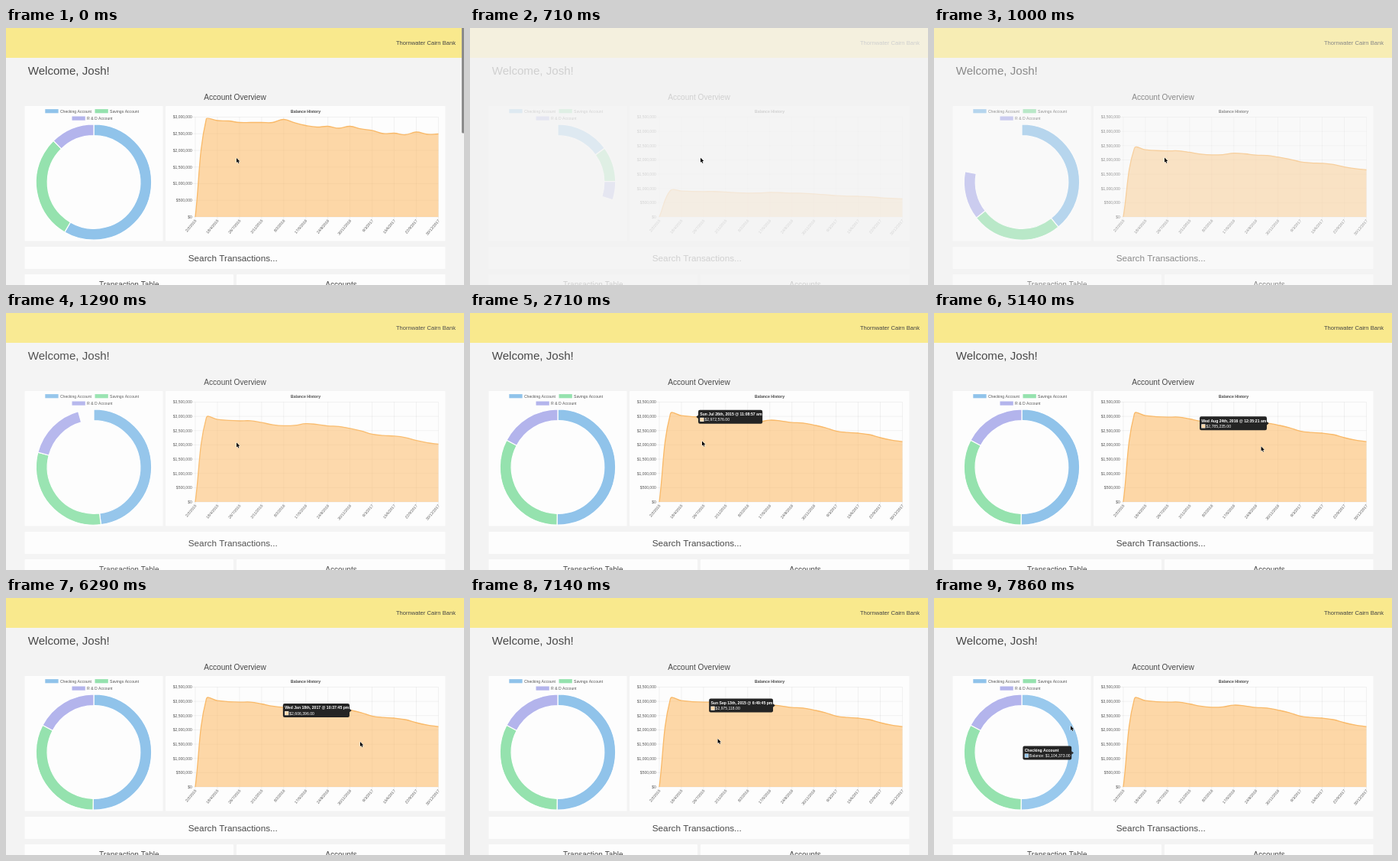
Recreate the animation shown at these times as an HTML page with a canvas. Size 600x336 px, loop 8000 ms.

```html
<!DOCTYPE html>
<html lang="en">
<head>
<meta charset="utf-8">
<title>Account overview</title>
<style>
html, body { margin: 0; width: 100%; height: 100%; overflow: hidden; background: #f3f3f3; }
canvas { display: block; width: 600px; height: 336px; }
</style>
</head>
<body>
<canvas></canvas>
<script>
const canvas = document.querySelector('canvas');
const c = canvas.getContext('2d');
const dpr = window.devicePixelRatio || 1;
canvas.width = 600 * dpr;
canvas.height = 336 * dpr;

const LOOP = 8000, STEP = 1000 / 7;
const BG = '#f3f3f3', CARD = '#fdfdfd';
const BLUE = '#90c3ea', GREEN = '#95e2ae', PURPLE = '#b3b4ec', ORANGE = '#f9b968';
const FILL = 'rgba(253,191,111,.6)';
const LEFT = 248, TOP = 116.5, BASE = 247, GAP = 14.475, LAST = 22;

// balances in thousands, donut split as fractions of a turn
const before = {
  max: 3000, split: [0, .584, .877, 1],
  vals: [0, 2954, 2897, 2885, 2839, 2839, 2839, 2839, 2931, 2828, 2747, 2701, 2724,
    2667, 2724, 2644, 2598, 2506, 2517, 2471, 2552, 2483, 2494]
};
const after = {
  max: 3500, split: [0, .502, .827, 1],
  vals: [0, 3087, 3025, 2987, 2972.576, 2975.118, 2910, 2830, 2792, 2805, 2868, 2841, 2785.235,
    2768, 2695, 2606.396, 2485, 2435, 2414, 2360, 2253, 2172, 2118]
};

// pointer path: time, x, y
const path = [
  [0, 302, 170], [2430, 302, 169], [2571, 296, 168], [2714, 304, 167.5], [3000, 308, 168],
  [4000, 385, 167], [4714, 455, 192], [5000, 439, 180], [5143, 428.6, 174.5], [5430, 426, 176],
  [6143, 453, 186], [6286, 464, 188], [6714, 475, 192], [7000, 400, 188], [7286, 249, 180],
  [7429, 188, 171], [7714, 181, 168], [7857, 179, 167], [8000, 179, 167]
];

const clamp = v => Math.max(0, Math.min(1, v));

function pointer(t) {
  const i = Math.max(1, path.findIndex(k => k[0] >= t));
  const [a, b] = [path[i - 1], path[i]];
  const f = clamp((t - a[0]) / (b[0] - a[0]));
  return [a[1] + (b[1] - a[1]) * f, a[2] + (b[2] - a[2]) * f];
}

function dateOf(k) {
  if (!k) return new Date(Date.UTC(2015, 1, 2, 9, 15, 20));
  const ms = Date.UTC(2015, 6, 26, 11, 8, 57) + (k - 4) * 4261248000;
  const month = new Date(ms).getUTCMonth();
  const winter = month < 3 || month > 9;
  return new Date(ms - winter * 3600000);
}

function shortDate(k) {
  const d = dateOf(k);
  return [d.getUTCDate(), d.getUTCMonth() + 1, d.getUTCFullYear()].join('/');
}

function longDate(k) {
  const d = dateOf(k), n = d.getUTCDate(), h = d.getUTCHours();
  const [day, , month] = d.toUTCString().replace(',', '').split(' ');
  const suffix = n > 10 && n < 14 ? 'th' : ['th', 'st', 'nd', 'rd'][n % 10] || 'th';
  const time = (h % 12 || 12) + d.toISOString().slice(13, 19);
  return `${day} ${d.toUTCString().split(' ')[2]} ${n}${suffix}, ${d.getUTCFullYear()} @ ${time} ${h < 12 ? 'am' : 'pm'}`;
}

function rect(x, y, w, h, color, r = 0) {
  c.fillStyle = color;
  c.beginPath();
  c.roundRect(x, y, w, h, r);
  c.fill();
}

function font(size, weight = '') {
  c.font = `${weight} ${size}px "Liberation Sans", Arial, sans-serif`;
}

function text(str, x, y, size, color = '#484848', align = 'left', weight = '') {
  font(size, weight);
  c.textAlign = align;
  c.fillStyle = color;
  c.fillText(str, x, y);
}

function line(x1, y1, x2, y2) {
  c.beginPath();
  c.moveTo(x1, y1);
  c.lineTo(x2, y2);
  c.stroke();
}

function legend(x, y, label, color) {
  rect(x, y, 17.3, 5.2, color);
  text(label, x + 19.6, y + 4.5, 5.1, '#555');
}

function donut(split, grow, hover) {
  const colors = [hover ? '#99c9ed' : BLUE, GREEN, PURPLE];
  c.strokeStyle = '#fff';
  c.lineWidth = 1.2;
  colors.forEach((color, i) => {
    const [a, b] = [split[i], split[i + 1]].map(s => (s * grow - .25) * 2 * Math.PI);
    c.beginPath();
    c.arc(115, 201.5, 75.7, a, b);
    c.arc(115, 201.5, 60.8, b, a, true);
    c.closePath();
    c.fillStyle = color;
    c.fill();
    c.stroke();
  });
}

function axes(max) {
  c.strokeStyle = 'rgba(0,0,0,.1)';
  c.lineWidth = .5;
  for (let v = 0; v <= max; v += 500) {
    const y = BASE - v / max * (BASE - TOP);
    line(LEFT - 4, y, LEFT + LAST * GAP, y);
    text('$' + (v * 1000).toLocaleString('en-US'), 243.7, y + 1.8, 5, '#555', 'right');
  }
  for (let k = 0; k <= LAST; k += 2) {
    const x = LEFT + k * GAP;
    line(x, TOP, x, BASE + 4);
    c.save();
    c.translate(x + .5, BASE + 4);
    c.rotate(-50 * Math.PI / 180);
    text(shortDate(k), 0, 1.8, 5, '#555', 'right');
    c.restore();
  }
}

const yOf = (data, k, grow = 1) => BASE - data.vals[k] / data.max * (BASE - TOP) * grow;

function area(data, grow) {
  const pts = data.vals.map((_, k) => [LEFT + k * GAP, yOf(data, k, grow)]);
  const cap = y => Math.max(TOP, Math.min(BASE, y));
  const handles = pts.map((p, i) => {
    const a = pts[i - 1] || p, b = pts[i + 1] || p;
    const d1 = Math.hypot(p[0] - a[0], p[1] - a[1]);
    const d2 = Math.hypot(b[0] - p[0], b[1] - p[1]);
    const [f, g] = [d1, d2].map(d => .4 * d / (d1 + d2));
    return [p[0] - f * (b[0] - a[0]), cap(p[1] - f * (b[1] - a[1])),
      p[0] + g * (b[0] - a[0]), cap(p[1] + g * (b[1] - a[1]))];
  });
  const curve = new Path2D();
  curve.moveTo(...pts[0]);
  for (let i = 1; i < pts.length; i++) {
    curve.bezierCurveTo(handles[i - 1][2], handles[i - 1][3], handles[i][0], handles[i][1], ...pts[i]);
  }
  const under = new Path2D(curve);
  under.lineTo(LEFT + LAST * GAP, BASE);
  under.lineTo(LEFT, BASE);
  c.fillStyle = FILL;
  c.fill(under);
  c.strokeStyle = ORANGE;
  c.lineWidth = 1.3;
  c.stroke(curve);
}

function tooltip(x, y, title, body, color, toRight) {
  font(5.1, 'bold');
  const titleW = c.measureText(title).width;
  font(5.1);
  const w = Math.max(titleW + 3, c.measureText(body).width + 10);
  const left = toRight ? x + 3 : x - 3 - w, side = toRight ? 3 : -3;
  const dark = '#242424';
  rect(left, y - 9, w, 18, dark, 2.2);
  c.beginPath();
  c.moveTo(x + side * .1, y);
  c.lineTo(x + side, y - 2.2);
  c.lineTo(x + side, y + 2.2);
  c.fill();
  text(title, left + 2.3, y - 1.7, 5.1, '#fff', 'left', 'bold');
  rect(left + 2.3, y + 1, 5.2, 5.2, '#fff');
  rect(left + 2.8, y + 1.5, 4.2, 4.2, color);
  text(body, left + 8.4, y + 5.5, 5.1, '#fff');
}

function lineTip(t) {
  const [x] = pointer(t), [lag] = pointer(t - STEP);
  if (t < 2430 || lag < LEFT) return;
  const pos = (lag - LEFT) / GAP, i = Math.floor(pos);
  const y = yOf(after, i) + (yOf(after, i + 1) - yOf(after, i)) * (pos - i);
  const k = Math.max(0, Math.min(LAST, Math.round((x - LEFT) / GAP)));
  const body = '$' + Math.round(after.vals[k] * 1000).toLocaleString('en-US') + '.00';
  // the first point sits on the axis
  tooltip(lag, pos < .5 ? BASE : y, longDate(k), body, '#fdd8a9', lag < 400);
}

function arrow(x, y) {
  const shape = [[0, 0], [0, 6], [1.4, 4.8], [2.4, 7.1], [3.4, 6.7], [2.4, 4.4], [4.3, 4.4]];
  c.beginPath();
  shape.forEach(([dx, dy]) => c.lineTo(x + dx, y + dy));
  c.closePath();
  c.strokeStyle = '#fff';
  c.lineWidth = .9;
  c.stroke();
  c.fillStyle = '#000';
  c.fill();
}

function page(data, grow, t) {
  const hover = t > 7500;
  rect(0, 0, 600, 39, '#f9e98d');
  text('Thornwater Cairn Bank', 589, 21.7, 7.6, '#444', 'right');
  text('Welcome, Josh!', 28.7, 61, 15.1);
  text('Account Overview', 300, 94, 10.15, '#484848', 'center');

  rect(24.5, 102, 181, 176.5, CARD, 1);
  legend(51.3, 106.1, 'Checking Account', BLUE);
  legend(116.5, 106.1, 'Savings Account', GREEN);
  legend(86.5, 115.5, 'R & D Account', PURPLE);
  donut(data.split, grow, hover);

  rect(209, 102, 366.5, 176.5, CARD, 1);
  text('Balance History', 392.5, 111, 5.2, '#484848', 'center', 'bold');
  axes(data.max);
  area(data, grow);

  rect(24.5, 286, 551, 29, CARD, 1);
  text('Search Transactions...', 297.3, 304.5, 11.75, '#484848', 'center');
  rect(24.5, 322, 273.5, 20, CARD, 1);
  rect(302, 322, 273.5, 20, CARD, 1);
  text('Transaction Table', 161.3, 338.8, 10, '#484848', 'center');
  text('Accounts', 439, 338.8, 10.15, '#484848', 'center');

  lineTip(t);
  if (hover) tooltip(183.2, 202.5, 'Checking Account', 'Balance: $1,104,373.00', BLUE, false);
}

function draw(t) {
  c.setTransform(dpr, 0, 0, dpr, 0, 0);
  rect(0, 0, 600, 336, BG);
  if (t < 140) {
    page(before, 1, t);
    rect(597, -3, 4, 140.5, '#8b8b8b', 1.5);
  } else if (t > 700) {
    const grow = 1 - (1 - clamp((t - 608) / 1247)) ** 4;
    const p = clamp((t - 423) / 1000);
    page(after, grow, t);
    c.globalAlpha = 1 - p * p * (3 - 2 * p);
    rect(0, 0, 600, 336, BG);
    c.globalAlpha = 1;
  }
  arrow(...pointer(t));
}

function tick() {
  const t = performance.now() % LOOP;
  draw(Math.floor((t + 5) / STEP) * STEP % LOOP);
  requestAnimationFrame(tick);
}
tick();
</script>
</body>
</html>
```
